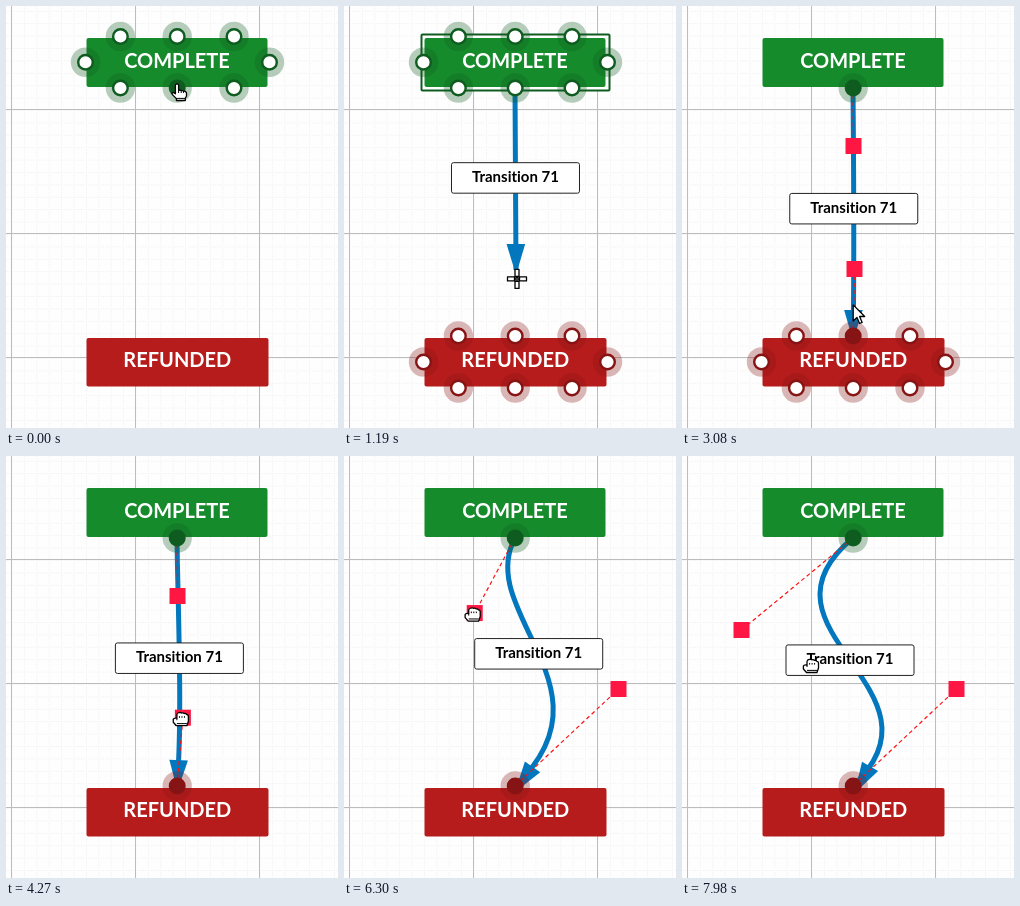
These frames come from a looping animation (332x422 px, 8 s). An HTML page:

```html
<!DOCTYPE html>
<html lang="en">
<head>
<meta charset="utf-8">
<title>Workflow transition</title>
<style>
  html, body { margin: 0; width: 100%; height: 100%; overflow: hidden; background: #fefefe; }
  svg { display: block; width: 332px; height: 422px; }
  text { font-family: Lato, sans-serif; font-weight: 700; text-anchor: middle; font-variant-ligatures: none; }
  .state { font-size: 20px; fill: #fff; }
  .guide { stroke: #f11; stroke-width: 1.2; stroke-dasharray: 4 3; }
  .handle { fill: #ff1744; }
  .cursor path { fill: #fff; stroke: #000; stroke-width: 1.3; stroke-linejoin: round; }
  .cursor .ink { fill: none; stroke-width: 1; }
</style>
</head>
<body>
<svg viewBox="0 0 332 422">
  <defs>
    <pattern id="minor" x="5.5" y="104" width="12.4" height="12.4" patternUnits="userSpaceOnUse">
      <path d="M.5 0V12.4M0 .5H12.4" fill="none" stroke="#ededed" stroke-dasharray="1 1.48"/>
    </pattern>
    <pattern id="major" x="5" y="103" width="124" height="124" patternUnits="userSpaceOnUse">
      <path d="M.5 0V124M0 .5H124" fill="none" stroke="#bcbcbc"/>
    </pattern>
  </defs>
  <rect width="332" height="422" fill="url(#minor)"/>
  <rect width="332" height="422" fill="url(#major)"/>

  <rect id="outline" x="77.5" y="28.5" width="188" height="56" rx="1" fill="#fff" stroke="#0f5c20" stroke-width="2"/>
  <rect x="80.5" y="32" width="181" height="49" rx="2" fill="#168b2c"/>
  <rect x="80.5" y="332" width="182" height="48.5" rx="2" fill="#b71c1c"/>
  <text class="state" x="171" y="62">COMPLETE</text>
  <text class="state" x="171.3" y="361">REFUNDED</text>

  <g id="link">
    <path id="curve" fill="none" stroke="#0277bd" stroke-width="5"/>
    <path id="head" d="M31 0L0-9.3V9.3Z" fill="#0277bd"/>
  </g>
  <g id="guides">
    <line id="guide1" class="guide"/>
    <line id="guide2" class="guide"/>
  </g>
  <g id="ports"></g>
  <g id="handles">
    <rect id="handle1" class="handle" x="-8" y="-8" width="16" height="16"/>
    <rect id="handle2" class="handle" x="-8" y="-8" width="16" height="16"/>
  </g>
  <g id="label">
    <rect x="-64" y="-15.2" width="128" height="30.5" rx="2" fill="#fff" stroke="#222"/>
    <text y="4" font-size="15">Transition 71</text>
  </g>

  <g id="point" class="cursor">
    <path d="M-1.6 1.5a1.6 1.6 0 0 1 3.2 0V6l2.4.3 2.4.5 2 .6 1.1 1.4V12l-1.2 2.3V16.5H-.6V14.6L-4.6 10.6q-1-2.2 1-2.2l2 1.4Z"/>
    <path class="ink" d="M1.6 6V9M4.2 6.5V9M6.6 7V9M-.6 14.4H8"/>
  </g>
  <g id="fist" class="cursor">
    <path d="M-4-1V-4.5q.3-2 2.2-2 1.6-.6 2.6.3 1.6-.6 2.6.5 1.7-.3 2.4 1 1.7 0 1.7 2V2L6 6.5H-4.5L-7.6 3V0q.6-1.5 3.6-1Z"/>
    <path class="ink" d="M-4-1V1M-1.4-3V-1.4M1.1-3V-1.4M3.6-3V-1.4M-4 4.4H6"/>
  </g>
  <g id="arrow" class="cursor">
    <path d="M0 0V16L3.8 12.5 6.4 18.6 9 17.5 6.4 11.6H11.5Z"/>
  </g>
  <g id="cross" class="cursor">
    <path d="M-2-9.5H2V-2.5H-2ZM-2 2.5H2V9.5H-2ZM-9.5-2H-2.5V2H-9.5ZM2.5-2H9.5V2H2.5Z"/>
    <path d="M-1.2-1.2H1.2V1.2H-1.2Z"/>
  </g>
</svg>
<script>
const LOOP = 8000, STEP = 70;
const DRAG = 350, LINK = 2590;
const SOURCE = [171, 82], TARGET = [171, 330];

const $ = id => document.getElementById(id);
const set = (el, attrs) => { for (const k in attrs) el.setAttribute(k, attrs[k]); };
const show = (id, on) => { $(id).style.display = on ? '' : 'none'; };
const move = (el, [x, y]) => set(el, { transform: `translate(${x} ${y})` });

const mix = (a, b, p) => a + (b - a) * p;
const mixPoint = (a, b, p) => a.map((v, i) => mix(v, b[i], p));
const progress = (t, from, to) => Math.min(1, Math.max(0, (t - from) / (to - from)));
const easeOut = (p, power) => 1 - (1 - p) ** power;
const smooth = p => p * p * (3 - 2 * p);

// Pointer paths
const drawLink = t => [173, mix(88, 329, easeOut(progress(t, DRAG, 1890), 1.85))];
const glide = (from, to, start, end) => t => mixPoint(from, to, progress(t, start, end));
const hold = (...point) => () => point;

function swing(t) {
  const p = progress(t, 3010, 3780);
  return [mix(171, 173, p), mix(325, 255, p) - 70 * Math.sin(Math.PI * p)];
}

// Curve handles
function handle1(t) {
  const p = progress(t, 5950, 7140);
  return [mix(171.5, 59.5, easeOut(p, 1.3)), mix(140, 174, easeOut(p, 2))];
}
const handle2 = t => mixPoint([172.5, 263], [274.5, 233], smooth(progress(t, 4160, 5040)));
const grip = handle => t => { const [x, y] = handle(t); return [x - 2, y + 1.5]; };

// Each shot: end time, cursor, position
const leave = glide([270, 233], [182, 164], 5180, 5460);
const approach = glide([182, 164], [172, 135], 5530, 5740);
const toLabel = glide([58, 174], [129, 210], 7420, 7980);
const shots = [
  [DRAG, 'point', hold(171, 78)],
  [LINK, 'cross', drawLink],
  [3080, 'point', hold(171, 325)],
  [3640, 'arrow', swing],
  [4270, 'point', swing],
  [5250, 'fist', grip(handle2)],
  [5530, 'arrow', leave],
  [5670, 'arrow', approach],
  [6020, 'point', approach],
  [7490, 'fist', grip(handle1)],
  [7910, 'arrow', toLabel],
  [LOOP, 'fist', toLabel]
];

function linkShape(t) {
  if (t >= LINK) return [SOURCE, handle1(t), handle2(t), TARGET];
  const y = drawLink(t)[1] - 9;
  const end = y > 309 ? TARGET : [172, Math.max(y, 84)];
  return [SOURCE, mixPoint(SOURCE, end, .234), mixPoint(end, SOURCE, .25), end];
}

function makePort(x, y, color) {
  const g = document.createElementNS('http://www.w3.org/2000/svg', 'g');
  g.innerHTML = `<circle r="14.7" fill="${color}" opacity=".3"/><circle r="7.3" stroke="${color}" stroke-width="2.4"/>`;
  move(g, [x, y]);
  $('ports').append(g);
  return { g, color };
}

// The first port of each node is the one the link uses
function makePorts(linkY, farY, color) {
  const sides = [-92, 92].map(dx => [171.5 + dx, (linkY + farY) / 2]);
  const rows = [linkY, farY].flatMap(y => [0, -56.8, 56.8].map(dx => [171.2 + dx, y]));
  return [...rows, ...sides].map(([x, y]) => makePort(x, y, color));
}
const complete = makePorts(82, 30.5, '#0f5c20');
const refunded = makePorts(330, 382, '#871414');

function setPorts(ports, open, linked) {
  ports.forEach(({ g, color }, i) => {
    const used = linked && i === 0;
    g.style.display = open || used ? '' : 'none';
    set(g.lastChild, { fill: used ? color : '#fff' });
  });
}

function setHandle(n, anchor, point) {
  set($('guide' + n), { x1: anchor[0], y1: anchor[1], x2: point[0], y2: point[1] });
  move($('handle' + n), point);
}

function setLink([start, c1, c2, end]) {
  const curve = $('curve');
  set(curve, { d: `M${start}C${c1} ${c2} ${end}` });
  const length = curve.getTotalLength();
  const base = curve.getPointAtLength(length - 26);
  const back = curve.getPointAtLength(length - 38);
  const angle = length > 38 ? Math.atan2(base.y - back.y, base.x - back.x) * 180 / Math.PI : 90;
  set($('head'), { transform: `translate(${base.x} ${base.y}) rotate(${angle})` });
  // The label rides on the middle of the curve
  move($('label'), start.map((s, i) => (s + 3 * c1[i] + 3 * c2[i] + end[i]) / 8));
  setHandle(1, start, c1);
  setHandle(2, end, c2);
}

function render(t) {
  const linked = t >= LINK, drawn = t > DRAG;
  show('outline', t >= DRAG && !linked);
  for (const id of ['link', 'label']) show(id, drawn);
  for (const id of ['guides', 'handles']) show(id, linked);
  setPorts(complete, !linked, linked || t < DRAG);
  setPorts(refunded, drawn && t < 3220, linked);
  setLink(linkShape(t));

  const [, kind, position] = shots.find(([until]) => t < until);
  for (const id of ['point', 'fist', 'arrow', 'cross']) show(id, id === kind);
  move($(kind), position(t));
}

const origin = performance.now();
function tick() {
  const t = (performance.now() - origin) % LOOP;
  render(Math.floor(t / STEP) * STEP);
  requestAnimationFrame(tick);
}
tick();
</script>
</body>
</html>
```
